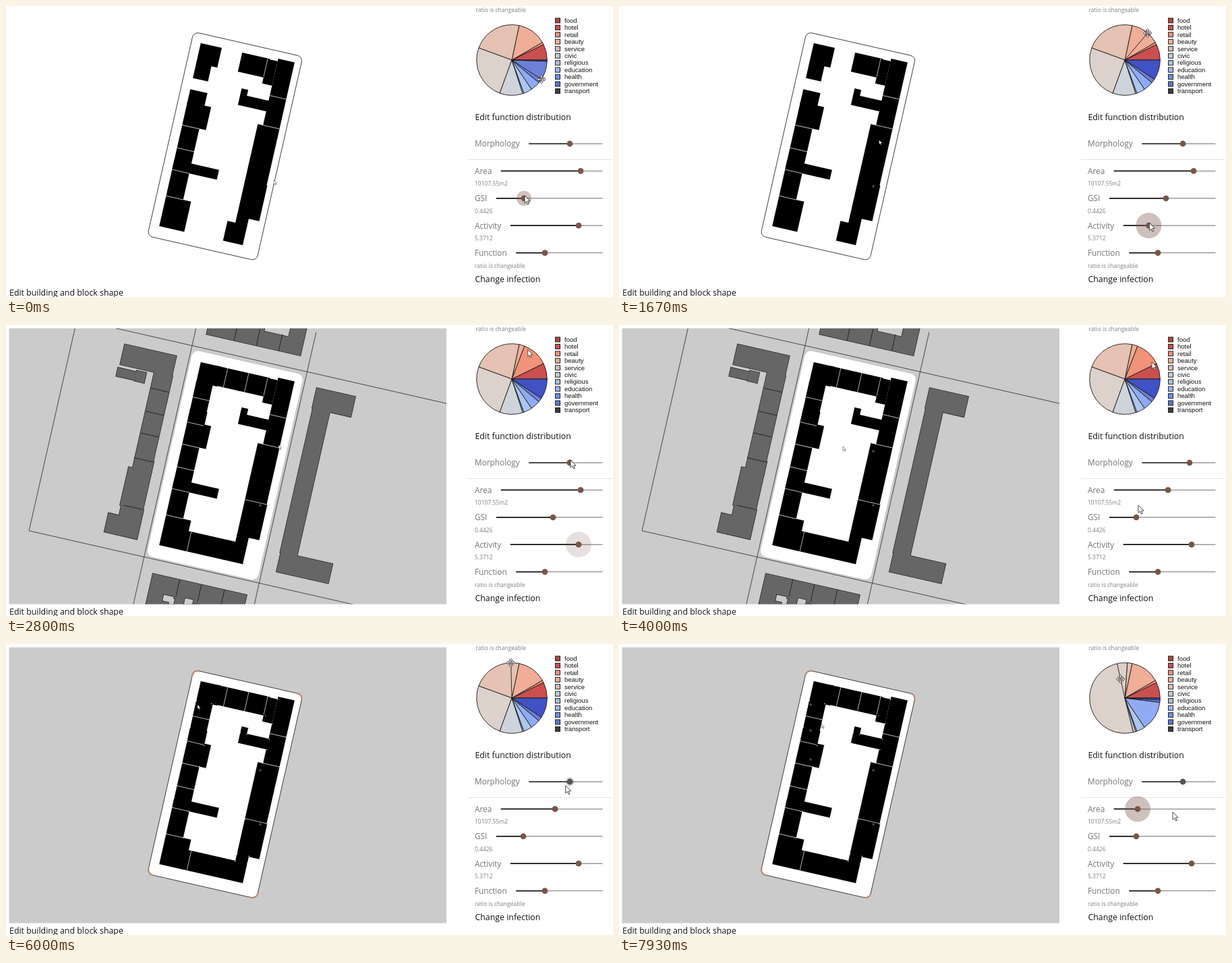
Animation, 900 px wide and 431 px high, one loop 8000 ms. Source, as an HTML page with a canvas:

```html
<!DOCTYPE html>
<html lang="en">
<head>
<meta charset="utf-8">
<title>Block editor</title>
<style>
html, body { margin: 0; width: 100%; height: 100%; overflow: hidden; background: #fff; }
canvas { display: block; width: 100%; height: 100%; }
</style>
</head>
<body>
<canvas id="stage" width="900" height="431"></canvas>
<script>
const ctx = document.getElementById('stage').getContext('2d');
const LOOP = 8000, STEP = 1000 / 15;
const SANS = '"Open Sans", "Noto Sans", sans-serif';
const ARIAL = '"Liberation Sans", Arial, sans-serif';
const INK = '#1a1a1a';

const clamp = (v) => Math.min(1, Math.max(0, v));
const ease = (p) => p * p * (3 - 2 * p);
const mix = (a, b, p) => a + (b - a) * p;
const progress = (m, t) => ease(clamp((t - m.start) / (m.end - m.start)));
const byTime = (a, b) => a[0] - b[0];

// Eased position along stops of [time, x, y].
function track(stops, t) {
  const i = stops.findIndex((s) => s[0] > t);
  if (i < 0) return stops[stops.length - 1].slice(1);
  if (i === 0) return stops[0].slice(1);
  const a = stops[i - 1], b = stops[i];
  const p = ease((t - a[0]) / (b[0] - a[0]));
  return [mix(a[1], b[1], p), mix(a[2], b[2], p)];
}

function disc(x, y, r, fill) {
  ctx.fillStyle = fill;
  ctx.beginPath();
  ctx.arc(x, y, r, 0, Math.PI * 2);
  ctx.fill();
}

function line(x1, y1, x2, y2, color, width = 0.8) {
  ctx.strokeStyle = color;
  ctx.lineWidth = width;
  ctx.beginPath();
  ctx.moveTo(x1, y1);
  ctx.lineTo(x2, y2);
  ctx.stroke();
}

function text(str, x, y, size, color, family = SANS) {
  ctx.font = `${size}px ${family}`;
  ctx.fillStyle = color;
  ctx.fillText(str, x, y);
}

// Pointers
const ARROW = new Path2D('M0 0V12.5L2.9 9.8 5 14.4 7 13.5 5 9H9Z');
const HAND = new Path2D('M-1.5 -5Q0 -7 1.2 -5V-1L5.5 0Q7 1 6.5 3L5 8H-1.5L-5 3Q-5.5 1 -3.5 1.5L-1.5 3Z');
const CROSS = new Path2D();
const CROSS_ARM = new Path2D('M-1 -1V-4H-2.8L0 -7 2.8 -4H1V-1');
for (let i = 0; i < 4; i++) CROSS.addPath(CROSS_ARM, new DOMMatrix().rotate(90 * i));

function stamp(path, [x, y], scale = 1) {
  ctx.save();
  ctx.translate(x, y);
  ctx.scale(scale, scale);
  ctx.fillStyle = '#fff';
  ctx.fill(path);
  ctx.strokeStyle = '#222';
  ctx.lineWidth = 0.9;
  ctx.stroke(path);
  ctx.restore();
}

// Map: everything stands on one tilted grid, as [u, v, width, height].
const CONTEXT_ON = 1800, CONTEXT_OFF = 4700;
const GROUND = '#cbcbcb', DARK = '#666';
const TILT = 12.8 * Math.PI / 180;
const BLOCK = [-14, -13, 166, 310];
const HOUSES = [
  [0, 1, 32, 30], [0, 30, 23, 24], [0, 71, 26, 22], [0, 90, 36, 35], [0, 125, 26, 35],
  [0, 160, 26, 33], [0, 178, 68, 15], [0, 193, 26, 40], [0, 233, 38, 46],
  [63, 1, 42, 29], [102, 2, 15, 37], [117, -2, 25, 56], [117, 54, 25, 45],
  [74, 62, 44, 16], [74, 53, 10, 10], [109, 99, 33, 87], [109, 185, 34, 54],
  [109, 238, 18, 12], [97, 249, 30, 30]
];
const INFILL = [[0, 30, 25, 62], [25, 1, 40, 29], [37, 249, 61, 30]];
const NEIGHBOURS = [
  [-116, 0, 79, 31], [-64, 30, 28, 131], [-64, 160, 29, 20], [-70, 176, 35, 58],
  [-68, 233, 34, 45], [-84, 249, 17, 29], [-118, 36, 28, 13], [-90, 34, 15, 16],
  [176, 0, 59, 31], [177, 30, 26, 220], [178, 249, 79, 30],
  [-1, -90, 143, 49], [0, 322, 143, 70]
];
const COURTS = [[82, -90, 36, 25], [23, 349, 15, 9], [33, 352, 7, 30], [55, 347, 12, 24], [70, 352, 10, 16]];

function houses(list, fill, outline) {
  ctx.strokeStyle = outline;
  ctx.lineWidth = 1.4;
  if (outline) list.forEach((r) => ctx.strokeRect(...r));
  ctx.fillStyle = fill;
  list.forEach((r) => ctx.fillRect(...r));
}
const across = (list, u1, u2, color) => list.forEach((v) => line(u1, v, u2, v, color));
const along = (list, v1, v2, color) => list.forEach((u) => line(u, v1, u, v2, color));

function drawContext() {
  along([-193], -20, 301, '#333');
  along([-18, 157], -80, 400, '#333');
  across([-20, 301], -193, 420, '#333');
  houses(NEIGHBOURS, DARK, INK);
  houses(COURTS, GROUND, INK);
  across([55, 90, 123, 161, 233], -64, -36, INK);
  along([41, 75, 109], -66, -41, INK);
  along([41, 74, 109], 322, 348, INK);
}

function drawBlock(outline, width) {
  ctx.beginPath();
  ctx.roundRect(...BLOCK, 8);
  ctx.fillStyle = '#fff';
  ctx.fill();
  ctx.strokeStyle = outline;
  ctx.lineWidth = width;
  ctx.stroke();
}

function drawHandles() {
  for (const [u, v, w, h] of HOUSES) {
    for (const x of [u, u + w]) for (const y of [v, v + h]) disc(x, y, 0.8, '#c9b8ae');
  }
  const [u, v, w, h] = BLOCK, r = 8;
  for (const sx of [0, 1]) for (const sy of [0, 1]) for (let i = 0; i < 5; i++) {
    const a = i * Math.PI / 8;
    const dx = r - r * Math.cos(a), dy = r - r * Math.sin(a);
    disc(sx ? u + w - dx : u + dx, sy ? v + h - dy : v + dy, 1.4, '#b98d72');
  }
}

// A true last value leaves a smudge where the pointer stopped.
const MAP_STOPS = [[0, 397, 258], [400, 377, 267, true], [870, 10, 420], [1000, 10, 420],
  [1870, 446, 163], [3500, 377, 187, true], [4000, 332, 180], [5070, 335, 148],
  [6000, 284, 90, true], [6200, 284, 128, true], [6450, 284, 171, true], [6870, 306, 118], [7930, 300, 118]];
const MAP_PATH = MAP_STOPS.map((s) => s.slice(0, 3));

function drawMap(t) {
  const full = t >= CONTEXT_ON, editing = t >= CONTEXT_OFF;
  ctx.save();
  ctx.beginPath();
  ctx.rect(4.5, 5, 648.5, 408.5);
  ctx.clip();
  if (full) {
    ctx.fillStyle = GROUND;
    ctx.fillRect(0, 0, 660, 420);
  }
  ctx.save();
  ctx.translate(289, 54);
  ctx.rotate(TILT);
  const context = full && !editing;
  if (context) drawContext();
  drawBlock(context ? '#fff' : '#222', context ? 2.4 : 0.8);
  houses(HOUSES, '#000');
  if (full) houses(INFILL, '#000');
  const seam = '#ccc';
  across([125.5, 160, 193, 233], 0, 26, seam);
  across([54], 117, 142, seam);
  across([99], 109, 142, seam);
  along([102], 1, 29, seam);
  if (full) {
    across([54, 92], 0, 25, seam);
    across([185], 109, 143, seam);
    along([41, 73], 1, 30, seam);
    along([42], 249, 279, seam);
  }
  if (editing) drawHandles();
  ctx.restore();
  for (const [at, x, y, smudge] of MAP_STOPS) if (smudge && t > at) disc(x, y, 2, '#3a3d40');
  stamp(ARROW, track(MAP_PATH, t), 0.5);
  ctx.restore();
  text('Edit building and block shape', 5, 429, 12.38, '#111');
}

// Pie
const PIE = { x: 750, y: 80, r: 52.3 };
const SLICES = ['#c9504f', '#f0937a', '#f0ad97', '#e5c2b3', '#ddd1cb', '#cfd3db',
  '#c0cfe8', '#adc7f2', '#8fabf4', '#6d80d8', '#4052c4'];
const BOUNDS = [0, 26, 30, 78, 160, 250, 288, 290, 304, 320, 358, 360];
// A dragged edge shows as a line and takes effect on release.
const PIE_DRAGS = [
  { start: -200, end: 250, edge: 10, from: 327, to: 327 },
  { start: 1070, end: 2250, edge: 2, from: 30, to: 69 },
  { start: 4900, end: 5700, edge: 2, from: 69, to: 30 },
  { start: 5750, end: 6050, edge: 4, from: 160, to: 86 },
  { start: 6150, end: 6400, edge: 5, from: 250, to: 284 },
  { start: 6450, end: 6700, edge: 9, from: 320, to: 353 },
  { start: 7050, end: 8300, edge: 4, from: 86, to: 107, reach: 0.55 }
];
const rad = (deg) => -deg * Math.PI / 180;
const spoke = (deg, reach = 1) => [
  PIE.x + PIE.r * reach * Math.cos(rad(deg)), PIE.y + PIE.r * reach * Math.sin(rad(deg))];
const PIE_PATH = [[4000, 790, 55], [6870, 766, 104]].concat(...PIE_DRAGS.map((d) => [
  [d.start, ...spoke(d.from, d.reach)], [d.end, ...spoke(d.to, d.reach)]])).sort(byTime);

function drawPie(t) {
  const edges = BOUNDS.slice();
  for (const d of PIE_DRAGS.filter((d) => t >= d.end)) {
    edges[d.edge] = d.to;
    edges[d.edge + 1] = Math.max(edges[d.edge + 1], d.to + 4);
  }
  SLICES.forEach((color, i) => {
    ctx.beginPath();
    ctx.moveTo(PIE.x, PIE.y);
    ctx.arc(PIE.x, PIE.y, PIE.r, rad(edges[i]), rad(edges[i + 1]), true);
    ctx.closePath();
    ctx.fillStyle = color;
    ctx.fill();
    ctx.strokeStyle = INK;
    ctx.lineWidth = 0.9;
    ctx.stroke();
  });
  const live = PIE_DRAGS.find((d) => t >= d.start && t < d.end);
  if (live) {
    const angle = mix(live.from, live.to, progress(live, t));
    line(PIE.x, PIE.y, ...spoke(angle), INK, 0.9);
    stamp(CROSS, spoke(angle, live.reach), 0.9);
  } else {
    const idle = t > 2250 && t < 4500;
    stamp(idle ? ARROW : HAND, track(PIE_PATH, t), idle ? 0.8 : 1);
  }
}

const LEGEND = { food: '#a8483f', hotel: '#c9504f', retail: '#e8927c', beauty: '#eeb09a',
  service: '#d6c0b6', civic: '#c6ccd4', religious: '#aec0dc', education: '#9db8ee',
  health: '#6d8fe6', government: '#5f78cc', transport: '#3c3c48' };

function drawLegend() {
  Object.entries(LEGEND).forEach(([name, color], i) => {
    const y = 21.5 + i * 10.45;
    ctx.fillStyle = color;
    ctx.fillRect(814.5, y - 3.5, 7, 7);
    ctx.strokeStyle = '#222';
    ctx.lineWidth = 1;
    ctx.strokeRect(814.5, y - 3.5, 7, 7);
    text(name, 828, y + 3.2, 9.5, '#111', ARIAL);
  });
}

// Sliders
const LEFT = 695, RIGHT = 884.5, LABEL = 11.8, NOTE = 8.5;
const SLIDERS = [
  { name: 'Morphology', value: 836, grey: [5600, LOOP] },
  { name: 'Area', value: 852, note: '10107.55m2' },
  { name: 'GSI', value: 767, note: '0.4426' },
  { name: 'Activity', value: 849, note: '5.3712' },
  { name: 'Function', value: 799, note: 'ratio is changeable', grey: [1820, 1950] }
];
const [MORPH, AREA, GSI, ACTIVITY] = SLIDERS;
const MOVES = [
  { slider: GSI, to: 811, start: -65, end: 650 },
  { slider: ACTIVITY, to: 784, start: 1100, end: 1720 },
  { slider: ACTIVITY, to: 849, start: 2100, end: 2500 },
  { slider: MORPH, to: 846, start: 2800, end: 2950 },
  { slider: AREA, to: 814, start: 3050, end: 3250 },
  { slider: GSI, to: 767, start: 3320, end: 3560 },
  { slider: MORPH, to: 836, start: 5300, end: 5600 },
  { slider: AREA, to: 863, start: 7000, end: 7280 },
  { slider: AREA, to: 769, start: 7400, end: 7750 }
];
const POINTER_PATH = [[930, 840, 328], [1870, 793, 357], [2660, 800, 372], [4000, 770, 267],
  [5070, 848, 207], [6870, 806, 241], [7930, 821, 249]];

SLIDERS.forEach((s, i) => { s.y = 204 + 40.4 * i; });
for (const m of MOVES) {
  const before = MOVES.filter((o) => o.slider === m.slider && o.end <= m.start).pop();
  m.from = before ? before.to : m.slider.value;
  POINTER_PATH.push([m.start, m.from + 1, m.slider.y - 4], [m.end, m.to + 1, m.slider.y - 4]);
}
POINTER_PATH.sort(byTime);

function drawSlider(s, t) {
  const move = MOVES.filter((m) => m.slider === s && m.start <= t).pop();
  const knob = move ? mix(move.from, move.to, progress(move, t)) : s.value;
  text(s.name, LEFT, s.y + 4.3, LABEL, '#757575');
  const x = LEFT + ctx.measureText(s.name).width + 13.5;
  if (s.note) text(s.note, LEFT, s.y + 22, NOTE, '#808080');
  line(knob, s.y, RIGHT, s.y, '#9a9a9a', 1.5);
  line(x, s.y, knob, s.y, '#111', 1.7);
  if (move) {
    const r = 5 + 14 * clamp((t - move.start) / 150);
    const fade = 1 - clamp((t - move.end - 200) / 200);
    disc(knob, s.y, r, `rgba(121,85,72,${0.36 * fade})`);
  }
  const grey = s.grey && t >= s.grey[0] && t < s.grey[1];
  if (grey && t < 7000) disc(knob, s.y, 6.5, 'rgba(80,70,70,0.25)');
  disc(knob, s.y, 4.4, grey ? '#555' : '#795548');
}

function drawPanel(t) {
  text('ratio is changeable', 696.5, 8.7, NOTE, '#808080');
  drawLegend();
  drawPie(t);
  text('Edit function distribution', 695.5, 168.6, 12.3, '#111');
  line(685, 227.5, 898, 227.5, '#e4e4e4', 1);
  SLIDERS.forEach((s) => drawSlider(s, t));
  text('Change infection', 695.5, 409, 12.35, '#111');
  stamp(ARROW, track(POINTER_PATH, t), 0.9);
}

const begin = performance.now();
function tick() {
  const t = (performance.now() - begin) % LOOP;
  const shown = Math.floor((t + 5) / STEP) * STEP;
  ctx.fillStyle = '#fff';
  ctx.fillRect(0, 0, 900, 431);
  drawMap(shown);
  drawPanel(shown);
  requestAnimationFrame(tick);
}
tick();
</script>
</body>
</html>
```
